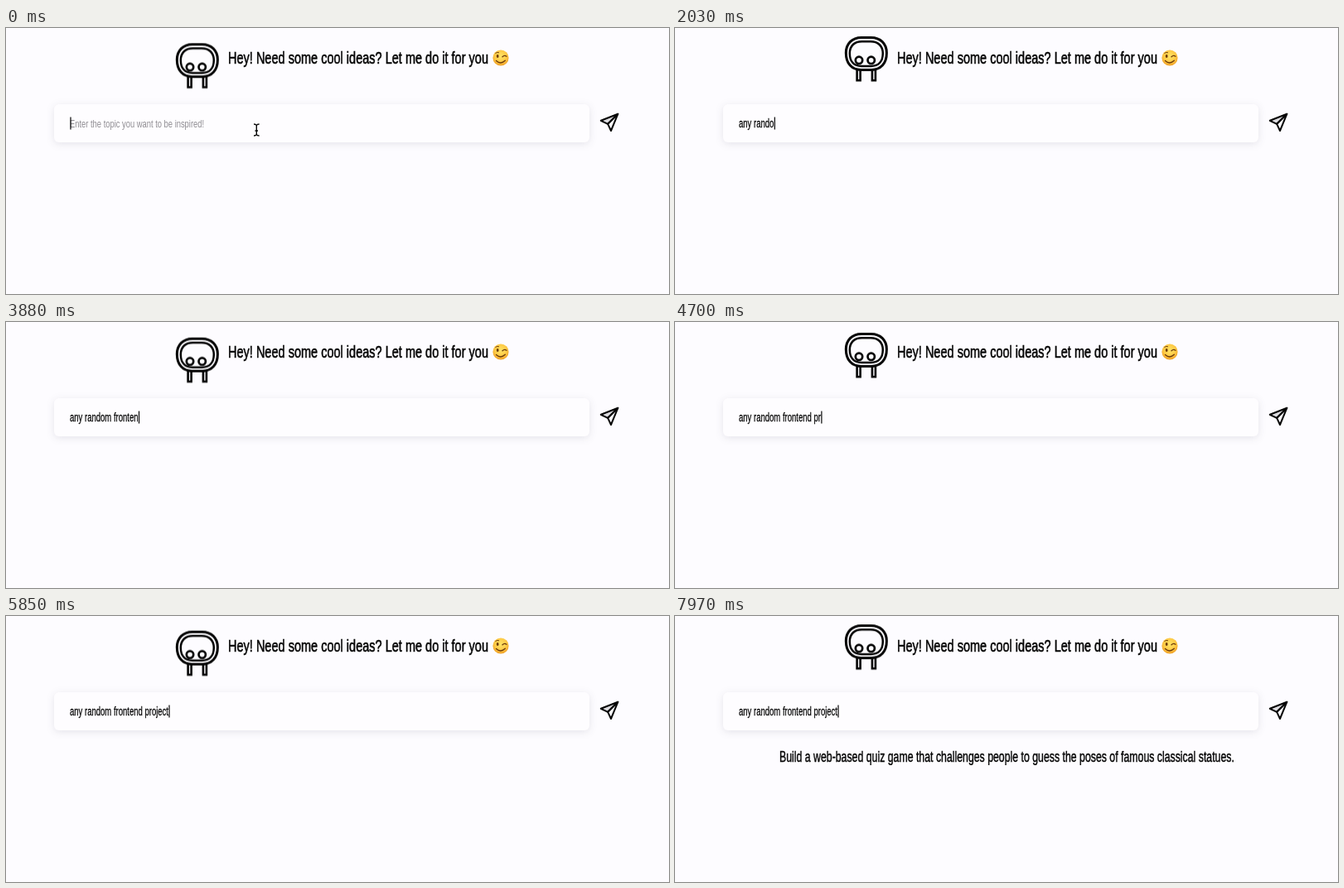
Write an HTML page that moves like this. It is 800x321 px and loops after 8000 ms.

```html
<!DOCTYPE html>
<html lang="en">
<head>
<meta charset="utf-8">
<title>Idea generator</title>
<style>
  html, body { margin: 0; width: 100%; height: 100%; overflow: hidden; background: #fdfcff; }
  svg { display: block; width: 100%; height: 100%; }
  .field { fill: #fefdff; filter: drop-shadow(0 2px 5px rgba(40, 35, 60, .11)); }
  .ink { fill: none; stroke: #050505; }
  text {
    font-family: "Liberation Sans", Arial, sans-serif;
    fill: #050505; stroke: #050505; stroke-width: .45; white-space: pre;
  }
  #title { font-size: 21.05px; stroke-width: .6; }
  #answer { font-size: 17.85px; }
  #typed { font-size: 13.8px; stroke-width: .25; }
  #hint { font-size: 13.6px; fill: #8f8d92; stroke: none; }
</style>
</head>
<body>
<svg viewBox="0 0 800 321">
  <defs>
    <radialGradient id="skin" cx=".5" cy=".4" r=".62">
      <stop offset="0" stop-color="#ffe467"/>
      <stop offset=".6" stop-color="#fdca45"/>
      <stop offset="1" stop-color="#ee9a22"/>
    </radialGradient>
  </defs>

  <g id="robot" class="ink">
    <rect x="219.6" y="50" width="4" height="13.2" stroke-width="2.6"/>
    <rect x="237.9" y="50" width="4" height="13.2" stroke-width="2.6"/>
    <path fill="#fdfcff" stroke-width="3" d="M225 11.5H236.500C248 11.500 255.400 19 255.400 30
      C255.400 43 248 50.400 237 50.400H224.500C213.500 50.400 206.300 43 206.300 30C206.300 19 213.500 11.500 225 11.500Z"/>
    <path stroke-width="2.500" d="M225.500 16.200H236C245 16.200 250.800 21.500 250.800 30.500
      C250.800 40.500 245.500 45.900 236.500 45.900H225C216 45.900 210.800 40.500 210.800 30.500C210.800 21.500 216.500 16.200 225.500 16.200Z"/>
    <circle cx="222" cy="38.800" r="4.200" stroke-width="2.700"/>
    <circle cx="236.700" cy="38.800" r="4.200" stroke-width="2.700"/>
  </g>

  <text id="title" transform="translate(268 43) scale(.69 1)">Hey! Need some cool ideas? Let me do it for you</text>

  <g fill="none" stroke="#6b3a0c" stroke-linecap="round">
    <circle cx="597" cy="36" r="9.600" fill="url(#skin)" stroke="none"/>
    <ellipse cx="593.200" cy="34" rx="1.400" ry="2" fill="#6b3a0c" stroke="none"/>
    <path stroke-width="1.300" d="M599 34.800Q601.300 32.200 604 34.200"/>
    <path stroke-width="1.300" d="M591.500 39.500Q597 44.500 602.300 39.300"/>
    <path stroke-width="1" d="M590.800 30.300Q592.500 28.800 594.500 29.600"/>
  </g>

  <rect class="field" x="58" y="92" width="646" height="46" rx="6"/>
  <text id="hint" transform="translate(77 119.500) scale(.69 1)">Enter the topic you want to be inspired!</text>
  <text id="typed" transform="translate(77 119.500) scale(.69 1)"></text>
  <rect id="caret" y="107.500" width="1.200" height="15" fill="#050505"/>

  <path id="pointer" class="ink" stroke-width="1.400"
    d="M299 116Q301.500 116 302.300 117.500Q303 116 305.600 116M302.300 117.500V128.500M299 130Q301.500 130 302.300 128.500Q303 130 305.600 130M300.500 124H304"/>

  <g class="ink" stroke-width="2" stroke-linejoin="round">
    <path fill="#dddce0" d="M738.300 103.800L717.800 111.800L726.200 115.800Z"/>
    <path d="M738.300 103.800L730 124L726.200 115.800Z"/>
  </g>

  <text id="answer" transform="translate(126 175.500) scale(.69 1)">Build a web-based quiz game that challenges people to guess the poses of famous classical statues.</text>
</svg>
<script>
  const LOOP = 8000, BLINK = 500, ANSWER_AT = 6800, CONDENSE = .69;
  const TOPIC = "any random frontend project";
  // Key press times, one per character
  const KEYS = [150, 270, 420, 690, 880, 1080, 1270, 1440, 1750, 2150, 2400, 2620, 2820, 3020,
    3220, 3420, 3620, 3820, 4020, 4220, 4400, 4580, 4800, 5000, 5200, 5420, 5650];
  const LAST_KEY = KEYS[KEYS.length - 1];

  const [robot, hint, typed, caret, pointer, answer] =
    ["robot", "hint", "typed", "caret", "pointer", "answer"].map(id => document.getElementById(id));
  const show = (el, on) => { el.style.visibility = on ? "visible" : "hidden"; };

  const bob = robot.animate(
    [{ transform: "translateY(0px)" }, { transform: "translateY(9px)" }],
    { duration: 1500, easing: "ease", iterations: Infinity, direction: "alternate" }
  );
  bob.pause();

  let shown = -1;
  function draw() {
    const t = performance.now() % LOOP;
    bob.currentTime = t + 980;

    const count = KEYS.filter(k => k <= t).length;
    if (count !== shown) {
      shown = count;
      typed.textContent = TOPIC.slice(0, count);
      const width = count ? typed.getComputedTextLength() * CONDENSE : 0;
      caret.setAttribute("x", 77.4 + width);
    }
    show(hint, count === 0);
    show(pointer, count === 0);
    show(caret, t < LAST_KEY || Math.floor((t - LAST_KEY) / BLINK) % 2 === 0);
    show(answer, t >= ANSWER_AT);
    requestAnimationFrame(draw);
  }
  draw();
</script>
</body>
</html>
```
